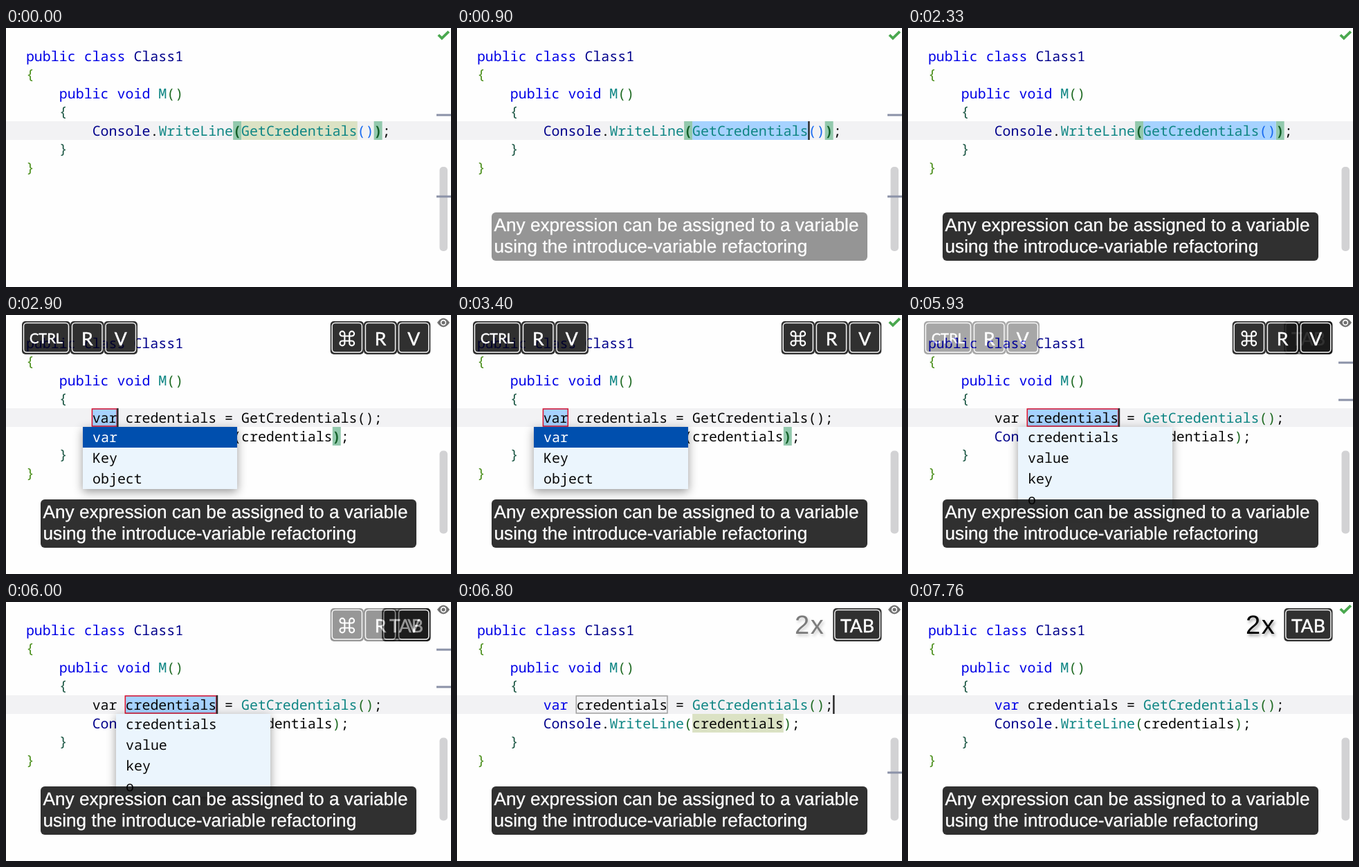
Animation, 643 px wide and 375 px high, one loop 8 s. Source, as an HTML page:

```html
<!DOCTYPE html>
<html lang="en">
<head>
<meta charset="utf-8">
<title>Introduce variable</title>
<style>
  html, body { margin: 0; width: 100%; height: 100%; overflow: hidden; background: #fefefe; }
  svg { display: block; width: 643px; height: 375px; }
  text { white-space: pre; text-rendering: geometricPrecision; }
  .code { font: 500 19.95px "Noto Sans Mono", monospace; font-variant-ligatures: none; }
  .cap { font: 26.2px "Liberation Sans", sans-serif; fill: #fff; stroke: #fff; stroke-width: .3; }
  .key { font-family: Lato, sans-serif; fill: #fff; stroke: #fff; stroke-width: .5; text-anchor: middle; }
  .times { font: 38px "Liberation Sans", sans-serif; letter-spacing: 1.5px; filter: drop-shadow(2px 3px 2px #0006); }
  .popup { filter: drop-shadow(0 4px 7px #0006); }
</style>
</head>
<body>
<svg id="stage" viewBox="0 0 643 375"></svg>
<script>
const LOOP = 8000, CELL = 11.97, ROW = 27, LEFT = 28.9;
const COLORS = {
  k: '#0000e6', n: '#00008b', m: '#0f8684', x: '#080808',
  g: '#4b8f1c', d: '#1c5744', p: '#1e6a22', b: '#1769f0', P: '#14602a'
};
const PAREN = '#93c9ad', USE = '#dbe2c4', SELECT = '#a6d2ff', TEMPLATE = '#e0102a';

const rect = (x, y, w, h, fill, more = '') =>
  `<rect x="${x}" y="${y}" width="${w}" height="${h}" fill="${fill}" ${more}/>`;
const colX = col => LEFT + col * CELL;
const rowY = row => row * ROW;

// Each part starts with its color letter: "k:public "
const line = (row, col, ...parts) =>
  `<text class="code" x="${colX(col)}" y="${48 + rowY(row)}">` +
  parts.map(p => `<tspan fill="${COLORS[p[0]]}"${p[0] === 'P' ? ' font-weight="700"' : ''}>${p.slice(2)}</tspan>`).join('') +
  '</text>';
const brace = (row, col, color, sign) =>
  `<text class="code" x="${colX(col)}" y="${46.5 + rowY(row)}" fill="${COLORS[color]}">${sign}</text>`;

const mark = (row, col, len, fill) => rect(colX(col), 27 + rowY(row), len * CELL, ROW, fill);
const frame = (col, len, color) =>
  rect(colX(col) - .25, 136, len * CELL, 25, 'none', `stroke="${color}" stroke-width="1.5"`);

const shell = rows =>
  line(0, 0, 'k:public class ', 'n:Class1') + brace(1, 0, 'g', '{') +
  line(2, 4, 'k:public void ', 'm:M', 'p:()') + brace(3, 4, 'd', '{') +
  brace(4 + rows, 4, 'd', '}') + brace(5 + rows, 0, 'g', '}');

const callLine = line(4, 8, 'n:Console', 'x:.', 'm:WriteLine', 'P:(', 'm:GetCredentials', 'b:()', 'P:)', 'x:;');
const parens = mark(4, 25, 1, PAREN) + mark(4, 42, 1, PAREN);
const thumb = (y, h) => rect(626.5, y, 11.5, h, '#d2d2d4', 'rx="5"');
const ticks = (...ys) => ys.map(y => rect(622, y - 1.5, 21, 3, '#8b92a8')).join('');

const popup = (x, items, selected) =>
  `<g class="popup">${rect(x, 162, 223, items.length * 30, '#ebf5fd')}</g>` +
  (selected ? rect(x, 162, 223, 30, '#004fae') : '') +
  items.map((s, i) => {
    const on = selected && i === 0;
    return `<text class="code" x="${x + 14}" y="${184 + i * 30}" fill="${on ? '#fff' : '#080808'}">${s}</text>`;
  }).join('');

const before = body => shell(1) + body + callLine + thumb(201, 122);
const after = body => shell(2) + body + thumb(196.5, 120);
const writeLine = line(5, 8, 'n:Console', 'x:.', 'm:WriteLine', 'p:(', 'x:credentials', 'p:)', 'x:;');
const declared = line(4, 8, 'k:var ', 'x:credentials = ', 'm:GetCredentials', 'p:()', 'x:;');
const renamed = after(mark(5, 26, 11, USE) + frame(12, 11, '#a0a0a0') + declared + writeLine);

// Editor states with their start times
const scenes = [
  [0, before(parens + mark(4, 26, 14, USE)) + ticks(126, 244)],
  [800, before(parens + mark(4, 26, 14, SELECT)) + ticks(126, 244)],
  [1300, before(parens + mark(4, 26, 16, SELECT))],
  [2830, after(
    mark(4, 8, 3, SELECT) + frame(8, 3, TEMPLATE) + mark(5, 37, 1, PAREN) +
    line(4, 8, 'x:var credentials = GetCredentials();') +
    line(5, 8, 'x:Console.WriteLine(credentials', 'P:)', 'x:;')) +
    popup(111, ['var', 'Key', 'object'], true)],
  [5900, after(
    mark(4, 12, 11, SELECT) + frame(12, 11, TEMPLATE) +
    line(4, 8, 'x:var credentials = ', 'm:GetCredentials', 'p:()', 'x:;') + writeLine) +
    popup(159, ['credentials', 'value', 'key', 'o'], false) + ticks(69, 123)],
  [6760, renamed + ticks(247)],
  [6900, renamed],
  [7100, after(declared + writeLine)]
];

// Caret: [from, to, column]
const carets = [
  [160, 660, 29], [800, 1300, 40], [1300, 2330, 42], [2830, 3380, 11],
  [3900, 4430, 11], [4930, 5430, 11], [5900, 6760, 23], [6760, 7760, 43]
];
const busy = [[2830, 3060], [5900, 6130], [6760, 6960]];

const command = (x, y) =>
  `<path transform="translate(${x} ${y}) scale(1.15) translate(-12 -12)" fill="none" stroke="#fff" stroke-width="1.8"
    d="M18 3a3 3 0 0 0-3 3v12a3 3 0 1 0 3-3H6a3 3 0 1 0 3 3V6a3 3 0 1 0-3 3h12a3 3 0 1 0 0-6z"/>`;
const keycap = (x, w, label, size = 26.5) =>
  rect(x, 9, w, 48, '#000', 'rx="5" fill-opacity=".81"') +
  rect(x + 2.5, 11.5, w - 5, 42.5, 'none', 'rx="4.5" stroke="#f4f4f4" stroke-width="1.5"') +
  (label === 'cmd' ? command(x + w / 2, 34)
    : `<text class="key" font-size="${size}" x="${x + w / 2}" y="${34 + size * .36}">${label}</text>`);

const stage = document.getElementById('stage');
const group = (id, body = '') => `<g id="${id}">${body}</g>`;
stage.innerHTML =
  rect(0, 0, 643, 375, '#fefefe') + rect(0, 135, 643, 27, '#f2f2f4') +
  scenes.map((s, i) => group('scene' + i, s[1])).join('') +
  rect(0, 135, 2.5, 27, '#2c2c2c', 'id="caret"') +
  group('check', '<path d="M624.8 10l5 4.8 10-9.6" fill="none" stroke="#4aa84f" stroke-width="3.8"/>') +
  group('eye', '<path d="M623 11q9-13 18 0q-9 13-18 0z" fill="#707070"/>' +
    '<circle cx="632" cy="11" r="3.4" fill="#707070" stroke="#fefefe" stroke-width="1.6"/>') +
  group('caption', rect(50, 267, 543, 70, '#000', 'rx="6" fill-opacity=".81"') +
    '<text class="cap" x="53.5" y="294.3">Any expression can be assigned to a variable</text>' +
    '<text class="cap" x="53.5" y="325.3">using the introduce-variable refactoring</text>') +
  group('ctrlKeys', keycap(23, 70, 'CTRL', 20) + keycap(93, 48.5, 'R') + keycap(141.5, 48.5, 'V')) +
  group('tabKey', keycap(543.3, 70.2, 'TAB')) +
  group('cmdKeys', keycap(468.7, 48.2, 'cmd') + keycap(516.9, 48.2, 'R') + keycap(565.1, 48.2, 'V')) +
  group('times', '<text class="times" x="488" y="46">2x</text>');

const el = id => document.getElementById(id);
const show = (id, on) => { el(id).style.display = on ? '' : 'none'; };
const ramp = (t, from, to) => Math.min(1, Math.max(0, (t - from) / (to - from)));
const fade = (id, a) => { show(id, a > 0); el(id).style.opacity = a; };
const within = t => ([from, to]) => t >= from && t < to;

function render(t) {
  const current = scenes.filter(s => t >= s[0]).length - 1;
  scenes.forEach((s, i) => show('scene' + i, i === current));

  const caret = carets.find(within(t));
  show('caret', caret);
  if (caret) el('caret').setAttribute('x', colX(caret[2]) - .5);

  const isBusy = busy.some(within(t));
  show('eye', isBusy);
  show('check', !isBusy);

  const keysIn = ramp(t, 2740, 2890);
  fade('caption', ramp(t, 800, 1000));
  fade('ctrlKeys', keysIn * (1 - ramp(t, 5850, 5990)));
  fade('cmdKeys', keysIn * (1 - ramp(t, 5930, 6070)));
  fade('tabKey', ramp(t, 5850, 5990));
  fade('times', ramp(t, 6740, 6860));
}

const start = performance.now();
function tick() {
  render((performance.now() - start) % LOOP);
  requestAnimationFrame(tick);
}
tick();
</script>
</body>
</html>
```
